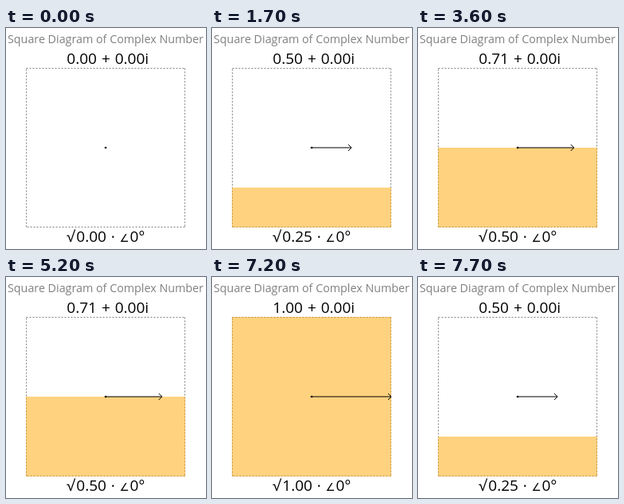
An HTML page that plays this animation: 251x277 px, repeating every 8 s.

```html
<!DOCTYPE html>
<html lang="en">
<head>
<meta charset="utf-8">
<style>
  html, body { margin: 0; width: 100%; height: 100%; overflow: hidden; background: #fff; }
  svg { display: block; }
  text { font: 19px "Open Sans", "Noto Sans", sans-serif; word-spacing: 1px; white-space: pre; }
  .title { font-size: 14.3px; word-spacing: 0; fill: #808080; }
  .angle { font: 13.5px "DejaVu Sans", sans-serif; }
</style>
</head>
<body>
<svg width="251" height="277" viewBox="0 0 251 277">
  <text class="title" x="2" y="19">Square Diagram of Complex Number</text>
  <text id="cartesian" x="76.3" y="45"></text>
  <path d="M25.5 50.5h199M224.5 50.5v199M224.5 249.5h-199M25.5 249.5v-199" stroke="#808080" stroke-dasharray="2 2"/>
  <rect id="area" x="25" width="200" fill="#ffa500" fill-opacity=".5"/>
  <circle cx="125" cy="150" r="1.3"/>
  <path id="arrow" fill="none" stroke="#000"/>
  <text y="268"><tspan x="76">√</tspan><tspan id="squared" x="88.3"></tspan><tspan x="131.7">·</tspan><tspan class="angle" x="142.5">∠</tspan><tspan x="155.5">0°</tspan></text>
</svg>
<script>
  const LOOP = 8000, STEP = 100, MOVE_STEPS = 4;
  const moves = [
    { start: 1200, to: 0.5 },
    { start: 3200, to: Math.SQRT1_2 },
    { start: 5200, to: 1 },
    { start: 7200, to: 0.5 },
  ];
  const $ = id => document.getElementById(id);

  function amplitudeAt(time) {
    let value = 0;
    for (const { start, to } of moves) {
      const step = Math.floor((time - start) / STEP);
      const progress = Math.min(1, Math.max(0, step / MOVE_STEPS));
      value += (to - value) * progress;
    }
    return value;
  }

  function draw(now) {
    const a = amplitudeAt(now % LOOP);
    const square = a * a;
    const tip = 125 + 100 * a;
    const head = Math.min(4, 100 * a);

    $("cartesian").textContent = `${a.toFixed(2)} + 0.00i`;
    $("squared").textContent = square.toFixed(2);
    $("area").setAttribute("y", 250 - 200 * square);
    $("area").setAttribute("height", 200 * square);
    $("arrow").setAttribute("d", a
      ? `M125 150H${tip}M${tip - head} ${150 - head}L${tip} 150L${tip - head} ${150 + head}`
      : "");
    requestAnimationFrame(draw);
  }
  draw(performance.now());
</script>
</body>
</html>
```
